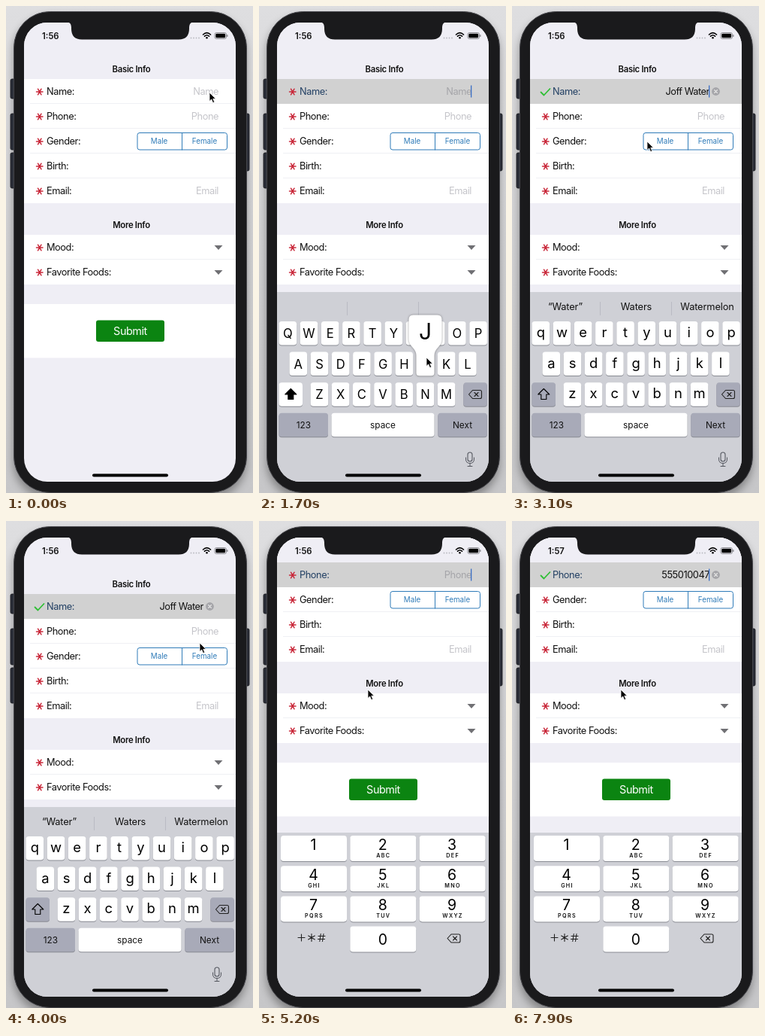
Write an HTML page that moves like this. It is 329 px wide and 647 px high and loops after 8 s.

```html
<!DOCTYPE html>
<html lang="en">
<head>
<meta charset="utf-8">
<title>Form demo</title>
<style>
  html, body { margin: 0; width: 100%; height: 100%; overflow: hidden; background: #d2d2d4; }
  svg { display: block; width: 100%; height: 100%; }
  text { font-family: Inter, Roboto, sans-serif; white-space: pre; }
</style>
</head>
<body>
<svg viewBox="0 0 329 647">
  <defs>
    <linearGradient id="wall" x2="0" y2="1">
      <stop stop-color="#dedee0"/><stop offset="1" stop-color="#c6c6c8"/>
    </linearGradient>
    <filter id="blur"><feGaussianBlur stdDeviation="6"/></filter>
    <clipPath id="screen"><rect x="24" y="22" width="282" height="610" rx="31"/></clipPath>
  </defs>
  <rect width="329" height="647" fill="url(#wall)"/>
  <rect x="10" y="14" width="310" height="640" rx="48" opacity=".35" filter="url(#blur)"/>
  <g fill="#2b2e38" stroke="#15161a" stroke-width=".8">
    <rect x="6" y="97" width="8" height="26" rx="2"/>
    <rect x="6" y="143" width="8" height="48" rx="2"/>
    <rect x="6" y="195" width="8" height="47" rx="2"/>
    <rect x="316" y="143" width="8" height="76" rx="2"/>
  </g>
  <rect x="10.5" y="7.5" width="310" height="639" rx="48" fill="#1a1a1c" stroke="#47474c"/>
  <g clip-path="url(#screen)">
    <rect x="24" y="22" width="282" height="610" fill="#efeef5"/>
    <g id="form"></g>
    <rect x="24" y="22" width="282" height="33" fill="#efeef5"/>
    <g id="status"></g>
    <g id="keyboard"></g>
    <rect x="115" y="621.5" width="101" height="4" rx="2"/>
  </g>
  <path d="M81 21Q87 22 87 28V30Q87 44.500 101 44.500H230Q244 44.500 244 30V28Q244 22 250 21Z" fill="#1a1a1c"/>
  <path id="pointer" d="M0 0V11.500L2.700 9L4.600 13.600L6.700 12.700L4.800 8.300H8.400Z" stroke="#fff" stroke-width=".8"/>
</svg>
<script>
const LOOP = 8000, STEP = 100;
const FULL_NAME = 'Joff Water', OTHER_NAME = 'Joff Hail', NUMBER = '555010047';
const BLUE = '#2f7bb8', KEYBOARD = '#cfd0d6', DARK_KEY = '#a8aab8';
const TIME = { focus: 200, pressJ: 1600, typeJ: 1900, pressO: 2100, typeO: 2300, pick: 3000, phone: 4400, digits: 5800 };
const POINTER = [[0, 271, 115], [300, 271, 116], [600, 268, 120], [800, 265, 150], [1500, 223, 467], [1900, 223, 467],
  [2100, 262, 428], [2300, 260, 425], [2500, 187, 183], [2700, 180, 180], [3200, 180, 180], [4000, 258, 162],
  [4250, 264, 146], [4500, 264, 146], [5100, 145, 224], [8000, 145, 224]];

const $ = id => document.getElementById(id);
const progress = (t, from, to) => Math.min(1, Math.max(0, (t - from) / (to - from)));
const rect = (x, y, w, h, fill, extra = '') =>
  `<rect x="${x}" y="${y}" width="${w}" height="${h}" fill="${fill}" ${extra}/>`;
const path = (d, stroke, width = 1, fill = 'none') =>
  `<path d="${d}" fill="${fill}" stroke="${stroke}" stroke-width="${width}" stroke-linecap="round" stroke-linejoin="round"/>`;
const text = (x, y, s, { size = 12.8, fill = '#111', anchor = 'start', weight = 400, space = -.035 } = {}) =>
  `<text x="${x}" y="${y}" font-size="${size}" fill="${fill}" text-anchor="${anchor}" font-weight="${weight}" letter-spacing="${(space * size).toFixed(2)}">${s}</text>`;
const centered = (x, y, s, style) => text(x, y, s, { anchor: 'middle', space: 0, ...style });

function pointerAt(t) {
  const i = Math.max(1, POINTER.findIndex(p => p[0] >= t));
  const [t0, x0, y0] = POINTER[i - 1], [t1, x1, y1] = POINTER[i];
  const p = progress(t, t0, t1), e = p * p * (3 - 2 * p);
  return [x0 + (x1 - x0) * e, y0 + (y1 - y0) * e];
}

function stateAt(t) {
  const count = t < TIME.digits ? 0 : Math.min(9, Math.floor((t - TIME.digits) / 260) + 1);
  return {
    name: t < TIME.typeJ ? '' : t < TIME.typeO ? 'J' : t < TIME.pick ? 'Jo' : FULL_NAME,
    phone: NUMBER.slice(0, count),
    active: t < TIME.focus ? '' : t < TIME.phone ? 'Name' : 'Phone',
    caret: t < 3800 || t >= 4200,
    popup: t >= TIME.pressJ && t < TIME.typeJ ? 'J' : t >= TIME.pressO && t < TIME.typeO ? 'o' : '',
    dropdown: t >= TIME.typeJ && t < TIME.pick,
    scroll: 75 * (1 - (1 - progress(t, TIME.phone, 4900)) ** 2.3),
    keyboardDrop: 267 * (1 - progress(t, TIME.focus, 700)) ** 2.3,
    clock: t < 6900 ? '1:56' : '1:57'
  };
}

function marker(y, done) {
  if (done) return path(`M38.500 ${y + .5}L42.500 ${y + 4.500}L50.500 ${y - 4}`, '#2fbf35', 1.8);
  return path(`M40.500 ${y}H49M42.500 ${y - 3.8}L47 ${y + 3.8}M47 ${y - 3.8}L42.500 ${y + 3.8}`, '#c9283a', 1.5);
}

function row(top, label, { active = false, value = '', input = false, caret = false, line = true } = {}) {
  const mid = top + 16.5;
  let out = rect(24, top, 282, 33, active ? '#d1d1d1' : '#fff');
  if (line && !active) out += rect(32, top + 32.5, 274, .7, '#dfe1ea');
  out += marker(mid + .5, value) + text(54, mid + 4.5, label + ':', { fill: active ? '#234064' : '#111' });
  if (!input) return out;
  const right = value ? 263 : 283;
  out += value ? text(right, mid + 4.5, value, { anchor: 'end' })
    : text(right, mid + 4.5, label, { anchor: 'end', fill: active ? '#a5a5a9' : '#c5c5ca' });
  if (active && caret) out += rect(right - 1, mid - 8, 1.3, 16, '#3a6ec4');
  if (active && value) out += `<circle cx="271.500" cy="${mid}" r="5.400" fill="#a6a6aa"/>` +
    path(`M269.500 ${mid - 2}l4 4m0 -4l-4 4`, '#e2e2e2', 1.1);
  return out;
}

const arrow = y => `<path d="M277.500 ${y - 3}h11l-5.500 6z" fill="#707074"/>`;

function drawForm(s) {
  const field = (top, label, value) =>
    row(top, label, { value, input: true, active: s.active === label, caret: s.caret });
  const heading = { size: 11.3, weight: 600, space: -.025 };
  let out = centered(167, 88, 'Basic Info', heading) +
    field(97, 'Name', s.name) + field(130, 'Phone', s.phone) +
    row(163, 'Gender') + row(196, 'Birth') + row(229, 'Email', { input: true, line: false }) +
    rect(175, 168.5, 119.5, 22.5, '#fff', `rx="3" stroke="${BLUE}"`) + path('M234.500 168.500V191', BLUE) +
    centered(204, 183.3, 'Male', { size: 9.8, fill: BLUE }) +
    centered(264.5, 183.3, 'Female', { size: 9.8, fill: BLUE }) +
    centered(167, 294.5, 'More Info', heading) +
    row(304, 'Mood') + row(337, 'Favorite Foods', { line: false }) + arrow(321) + arrow(354) +
    rect(24, 396, 282, 71.5, '#fff') + rect(120, 417.5, 91, 28.5, '#0b8411', 'rx="3"') +
    centered(165.5, 437, 'Submit', { size: 14.4, fill: '#fff', space: -.03 });
  if (s.dropdown) {
    out += rect(103, 130, 180, 225, '#fff');
    for (let y = 163; y < 350; y += 33) out += rect(114, y - .5, 169, .7, '#e6e7ec');
    out += text(114, 149.5, OTHER_NAME, { size: 9.1, space: 0 }) + text(114, 182.5, FULL_NAME, { size: 9.1, space: 0 });
  }
  return `<g transform="translate(0 ${-s.scroll})">${out}</g>`;
}

function drawStatus(s) {
  let out = text(48, 43.5, s.clock, { size: 11.3, weight: 600, space: 0 });
  for (let i = 0; i < 4; i++) out += `<circle cx="${246.500 + i * 3.500}" cy="42.500" r=".9" fill="#b9b9c0"/>`;
  return out + path('M262.500 38Q267.500 33.300 272.500 38M264.500 40.200Q267.500 37.300 270.500 40.200', '#000', 1.6) +
    '<circle cx="267.500" cy="42.200" r="1.300"/>' +
    rect(278, 35.5, 15.5, 8, 'none', 'rx="2.200" stroke="#77777c" stroke-width=".8"') +
    rect(279.3, 36.8, 12.9, 5.4, '#000', 'rx="1.200"') + rect(294.3, 38, 1.1, 3, '#77777c', 'rx=".5"');
}

const key = (x, y, w, h, fill = '#fff') => rect(x, y + 1, w, h, '#898b93', 'rx="3.800"') + rect(x, y, w, h, fill, 'rx="3.800"');
const deleteIcon = (x, y) =>
  path(`M${x - 8.500} ${y}l5 -5.500h10q2 0 2 2v7q0 2 -2 2h-10zM${x - 1} ${y - 2.500}l5 5m0 -5l-5 5`, '#222', 1.1);

function popup(x, y, letter) {
  const c = x + 11.8;
  return `<g style="filter:drop-shadow(0 .5px 1.500px #0006)"><path fill="#fff" d="M${c - 16} ${y - 49}h32q6 0 6 6v26
    q0 6 -5 11q-5 5 -5 11v23q0 4 -4 4h-16q-4 0 -4 -4v-23q0 -6 -5 -11q-5 -5 -5 -11v-26q0 -6 6 -6z"/></g>` +
    centered(c, y - 17, letter, { size: 30, fill: '#000' });
}

function suggestions(name) {
  if (name === FULL_NAME) return ['“Water”', 'Waters', 'Watermelon'];
  return name === 'Jo' ? ['“Jo”', 'Join', 'job'] : name ? ['“J”', 'Just', 'Join'] : [];
}

function letterKeyboard(s) {
  const upper = !s.name;
  let out = rect(24, 380, 282, 270, KEYBOARD), bubble = '';
  out += rect(117, 393, .8, 18, '#b4b6bf') + rect(212, 393, .8, 18, '#b4b6bf');
  suggestions(s.name).forEach((word, i) => out += centered(71 + i * 94.5, 404, word, { space: -.01 }));
  ['qwertyuiop', 'asdfghjkl', 'zxcvbnm'].forEach((letters, r) => {
    [...letters].forEach((c, i) => {
      const x = [26.5, 40.5, 68.6][r] + i * 28.2, y = 419 + r * 40.6;
      const label = upper ? c.toUpperCase() : c;
      out += key(x, y, 23.6, 31.5);
      out += centered(x + 11.8, y + (upper ? 22 : 21), label, { size: upper ? 16.6 : 18.4, fill: '#000' });
      if (label === s.popup) bubble = popup(x, y, label);
    });
  });
  out += key(26.5, 500.2, 31.5, 31.5, upper ? '#fff' : DARK_KEY) +
    path('M42.300 508.500l7.500 7.500h-4v6.500h-7v-6.500h-4z', '#000', 1.1, upper ? '#000' : 'none') +
    key(272.3, 500.2, 31.5, 31.5, DARK_KEY) + deleteIcon(288, 516) +
    key(26.5, 540.8, 65.5, 31.5, DARK_KEY) + key(96.5, 540.8, 137, 31.5) + key(238.3, 540.8, 65.5, 31.5, DARK_KEY) +
    centered(59.3, 561, '123', { size: 11.8 }) + centered(165, 560.5, 'space', { size: 11.8 }) +
    centered(271, 560.5, 'Next', { size: 11.8 }) +
    rect(278, 593, 6, 12, 'none', 'rx="3" stroke="#555860" stroke-width="1.100"') +
    path('M275.500 600v2q0 5.500 5.500 5.500t5.500 -5.500v-2M281 607.500v4M278 611.500h6', '#555860');
  return `<g transform="translate(0 ${s.keyboardDrop})">${out + bubble}</g>`;
}

function numberPad() {
  let out = rect(24, 414, 282, 230, KEYBOARD);
  ['', 'ABC', 'DEF', 'GHI', 'JKL', 'MNO', 'PQRS', 'TUV', 'WXYZ'].forEach((letters, i) => {
    const x = 29 + i % 3 * 92.3, y = 418 + Math.floor(i / 3) * 40.2;
    out += key(x, y, 88, 34) + centered(x + 43.5, y + 19, i + 1, { size: 19.5, fill: '#000' }) +
      centered(x + 44.5, y + 29, letters, { size: 7.2, weight: 600, space: .18 });
  });
  out += key(121.3, 538.6, 88, 34) + centered(165, 562.5, '0', { size: 19.5, fill: '#000' });
  const y = 553.5;
  out += path(`M52 ${y}h9M56.500 ${y - 4.500}v9M70 ${y - 5}v10M65.700 ${y - 2.500}l8.600 5m0 -5l-8.600 5` +
    `M79 ${y - 2}h9M78.500 ${y + 2}h9M82.300 ${y - 5}l-1.500 10M86 ${y - 5}l-1.500 10`, '#222', 1.1);
  return out + deleteIcon(259.5, 554.5);
}

function draw(t) {
  const s = stateAt(t);
  $('form').innerHTML = drawForm(s);
  $('status').innerHTML = drawStatus(s);
  $('keyboard').innerHTML = s.active === 'Phone' ? numberPad() : s.active ? letterKeyboard(s) : '';
  $('pointer').setAttribute('transform', `translate(${pointerAt(t)})`);
}

let shown = -1;
function tick() {
  const t = Math.floor(performance.now() % LOOP / STEP) * STEP;
  if (t !== shown) draw(shown = t);
  requestAnimationFrame(tick);
}
tick();
</script>
</body>
</html>
```
